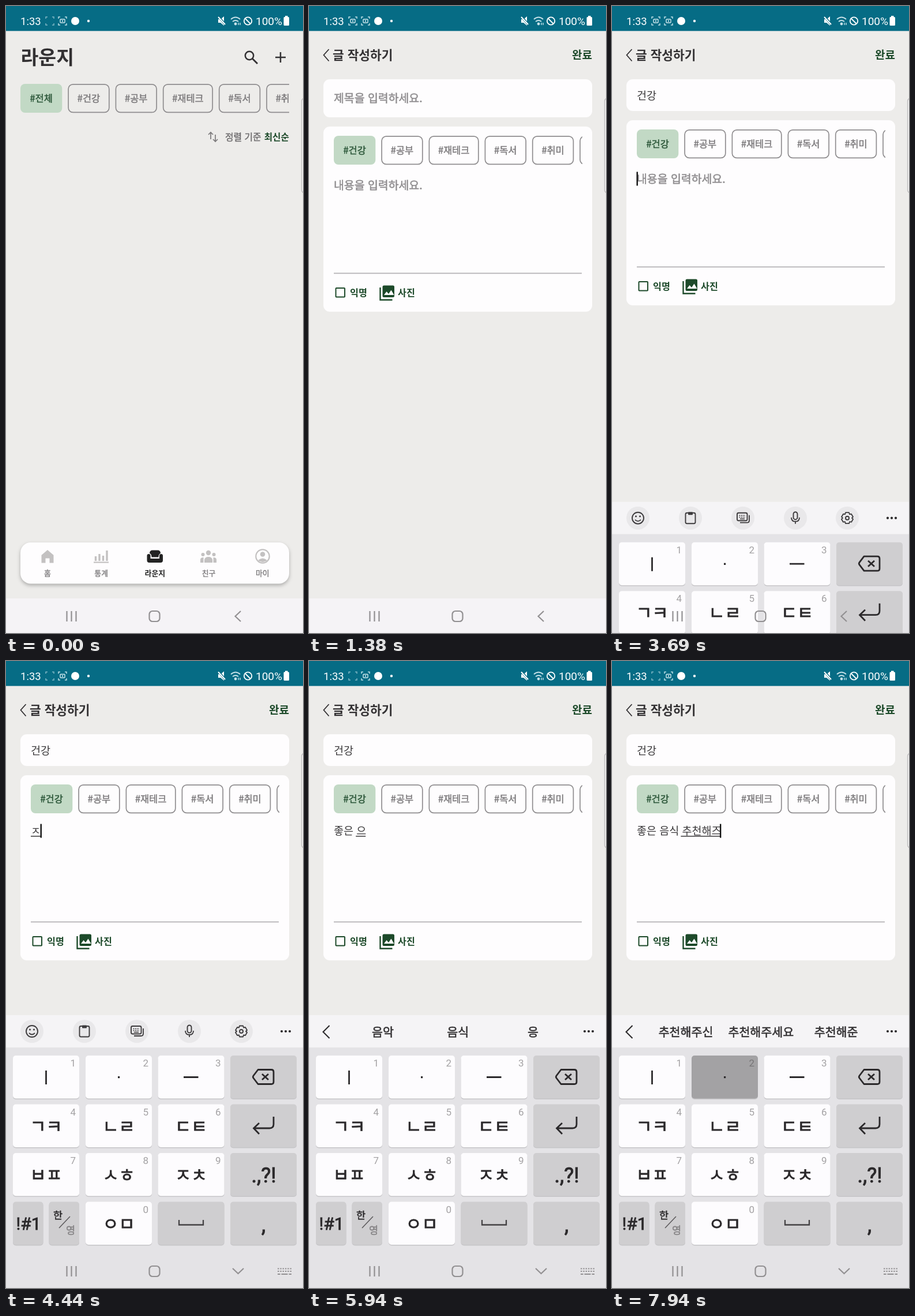
An HTML page that plays this animation: 515x1087 px, repeating every 8 s.

```html
<!DOCTYPE html>
<html lang="ko">
<head>
<meta charset="utf-8">
<style>
html, body { margin: 0; height: 100%; overflow: hidden; background: #edecea; }
svg { display: block; width: 100%; height: 100%; font-family: "Noto Sans CJK KR", "Noto Sans CJK", "Noto Sans", sans-serif; }
.r { font-family: Roboto, sans-serif; }
</style>
</head>
<body>
<svg id="stage" viewBox="0 0 515 1087"></svg>
<script>
const LOOP = 8000, GREEN = '#1d4a2a', GRAY = '#7b797b', INK = '#333133', PALE = '#c3c1c1';
const stage = document.getElementById('stage');

// y is the vertical middle of the text; weight 500 is thickened with a thin outline
function text(x, y, s, size, fill, anchor = 'start', weight = 400, cls = '') {
  const outline = weight === 500 ? `stroke="${fill}" stroke-width="${size * .027}"` : '';
  return `<text x="${x}" y="${y + size * .37}" font-size="${size}" fill="${fill}" text-anchor="${anchor}" font-weight="${weight === 700 ? 700 : 400}" class="${cls}" ${outline}>${s}</text>`;
}
const mid = (x, y, s, size, fill, weight, cls) => text(x, y, s, size, fill, 'middle', weight, cls);
const rect = (x, y, w, h, fill, r = 0, extra = '') =>
  `<rect x="${x}" y="${y}" width="${w}" height="${h}" rx="${r}" fill="${fill}" ${extra}/>`;
const dot = (x, y, r, fill, extra = '') => `<circle cx="${x}" cy="${y}" r="${r}" fill="${fill}" ${extra}/>`;
const line = (d, color, w = 2, extra = '') =>
  `<path d="${d}" fill="none" stroke="${color}" stroke-width="${w}" ${extra}/>`;
const shape = (d, fill) => `<path d="${d}" fill="${fill}"/>`;
const group = (s, attrs) => `<g ${attrs}>${s}</g>`;
const textWidth = (s, size) => [...s].reduce((w, c) => w + (c === ' ' ? .224 : .92), 0) * size;
const clamp = v => Math.max(0, Math.min(1, v));
const ease = v => 1 - (1 - clamp(v)) ** 3;

function chips(x, y, names, clip) {
  let s = '';
  names.forEach((name, i) => {
    const w = name.length > 2 ? 87 : 72.3;
    s += i ? rect(x + .8, y + .8, w - 1.6, 48.6, 'none', 8, 'stroke="#8f8d8f" stroke-width="1.7"')
           : rect(x, y, w, 50, '#c2d9c5', 8);
    s += mid(x + w / 2, y + 25, '#' + name, 16.4, i ? GRAY : '#2b5638', 500);
    x += w + 10;
  });
  return `<svg width="${clip}" height="1087" viewBox="0 0 ${clip} 1087">${s}</svg>`;
}

function statusBar(t) {
  const full = t % 2000 > 1250 && t % 2000 < 1850;
  const bracket = (x, color) => line(`M${x - 7} 22v-3h3M${x + 4} 19h3v3M${x + 7} 30v3h-3M${x - 4} 33h-3v-3`, color, 1.5);
  const camera = x => rect(x - 4, 23, 8, 6, 'none', 1, 'stroke="#d6eaef" stroke-width="1.4"') + dot(x, 26, 1.2, '#d6eaef');
  return rect(0, 0, 515, 43.3, '#066c85') +
    text(25, 26, '1:33', 18.5, '#fff', 'start', 400, 'r') +
    bracket(76, full ? '#b9dbe3' : '#7fb5c3') + (full ? camera(76) : '') + bracket(98, '#b9dbe3') + camera(98) +
    dot(120, 26, 7, '#fff') + dot(143, 26, 2.2, '#fff') +
    shape('M368 23h4l6-5v16l-6-5h-4z', '#fff') + line('M368 18l13 15', '#066c85', 4) + line('M368 19l12 13', '#fff', 2) +
    line('M390 23q8-7 16 0M393 27q5-4 10 0', '#c6e1e8', 1.8) + dot(398, 31, 2.4, '#c6e1e8') +
    line('M403 29v4m3-4v4', '#c6e1e8', 1.4) +
    line('M414 21l10 10', '#fff', 1.8) + dot(419.5, 26, 6.7, 'none', 'stroke="#fff" stroke-width="1.8"') +
    text(433, 26, '100%', 19, '#fff', 'start', 400, 'r') +
    rect(481.5, 19, 9.5, 15, '#fff', 1.5) + rect(484, 17, 4.5, 3, '#fff');
}

function tabBar() {
  const tabs = ['홈', '통계', '라운지', '친구', '마이'];
  return rect(25, 930, 466, 71.5, '#fefdfe', 18, 'style="filter:drop-shadow(0 3px 3px #0004)"') +
    shape('M61.5 952L72 943l10.5 9v13.5h-7v-8h-7v8h-7z', PALE) +
    line('M155.5 962v-8M162 962v-12M168.5 962v-9M175 962v-18', PALE, 3.4) + line('M152 964.5h26', PALE, 2.2) +
    shape('M249 949q0-5.5 5-5.5h9q5 0 5 5.5q-3.5 1-3.5 6.5h-12q0-5.5-3.5-6.5z', '#232323') +
    shape('M244.5 953q0-3 3-3t3 3v5h15.5v-5q0-3 3-3t3 3v8q0 4-4 4h-19.5q-4 0-4-4z', '#232323') +
    dot(351, 948, 4.2, PALE) + dot(341.5, 951, 3, PALE) + dot(360.5, 951, 3, PALE) +
    shape('M344 965v-5q1-5 7-5t7 5v5zM337 965v-5q0-4 5.5-4v9zM365 965v-5q0-4-5.5-4v9z', PALE) +
    dot(445, 954, 11.7, 'none', `stroke="${PALE}" stroke-width="2.2"`) + dot(445, 950.5, 4.3, PALE) +
    shape('M437 961q8-7 16 0q-8 6-16 0z', PALE) +
    tabs.map((s, i) => mid(72 + i * 93.2, 983, s, 12.9, i === 2 ? '#232323' : GRAY, i === 2 ? 700 : 500)).join('');
}

function lounge() {
  return text(25.5, 89, '라운지', 33.5, INK, 'start', 700) +
    dot(422, 86, 7.2, 'none', `stroke="${INK}" stroke-width="2.5"`) + line('M427 91l9 9', INK, 2.8) +
    line('M467 89h18M476 80v18', INK, 2.5) +
    chips(25, 135, ['전체', '건강', '공부', '재테크', '독서', '취미'], 491) +
    line('M355 231v-12m-4 4l4-4 4 4M363 223v12m-4-4l4 4 4-4', GRAY, 1.7) +
    text(380, 227, '정렬 기준', 15.8, '#6f6d6f', 'start', 500) +
    text(491, 227, '최신순', 15.7, GREEN, 'end', 700) + tabBar();
}

// Editable text, underlined while the word is being composed, with its caret
function field(x, y, value, hint, hintY, caret) {
  const word = value === '건강' ? '' : value.split(' ').pop();
  const end = x + textWidth(value, 18.5), start = end - textWidth(word, 18.5);
  return (value ? text(x, y, value, 18.5, '#3a383a') : text(x, hintY, hint, 19.4, '#8f8d8f', 'start', 500)) +
    (word ? rect(start, y + 8.5, end - start, 1.5, '#3a383a') : '') +
    (caret ? rect(end - .5, (value ? y : hintY) - 12, 2.4, 24, '#111') : '');
}

function editor(s) {
  const up = s.title ? -11 : 0;
  const body = rect(25, 209, 466, 321, '#fefdfe', 11) +
    chips(43, 225, ['건강', '공부', '재테크', '독서', '취미', '취업'], 474) +
    field(43, 305.5, s.body, '내용을 입력하세요.', 310.5, s.caret && s.inBody) +
    rect(43, 462.5, 430, 1.8, '#b5b3b6') +
    rect(46.5, 489, 15.5, 15.5, 'none', 1, `stroke="${GREEN}" stroke-width="2"`) +
    text(71, 497, '익명', 16.2, GREEN, 'start', 700) +
    line('M123.5 488v21.5h21', GREEN, 2.4) + rect(127.5, 484.5, 20.5, 20.5, GREEN, 2.5) +
    shape('M130 501l4.5-6 3.5 4 4.5-6.5 5 8.5z', '#fefdfe') +
    text(154, 497, '사진', 16.2, GREEN, 'start', 700);
  return line('M34.5 75l-9 10 9 10.5', INK, 1.8) +
    text(41, 85, '글 작성하기', 21.4, INK, 'start', 700) +
    text(491, 85, '완료', 19, GREEN, 'end', 700) +
    rect(25, 127, 466, 66 + up, '#fefdfe', 11) +
    field(43, 155, s.title, '제목을 입력하세요.', 160, s.caret && !s.inBody) +
    group(body, `transform="translate(0 ${up})"`);
}

function toolIcons() {
  const c = '#3c3a3c', o = `stroke="${c}" stroke-width="1.9"`;
  return [45, 136, 227, 318, 408].map(x => dot(x, 642, 20, '#e9e8ea')).join('') +
    dot(45, 642, 10, 'none', o) + dot(41.5, 639, 1.5, c) + dot(48.5, 639, 1.5, c) + line('M40 645q5 5 10 0', c, 1.8) +
    rect(127.5, 633, 17, 18.5, 'none', 2.5, o) + rect(132, 631.5, 8, 5, c, 1) +
    rect(217, 633, 17.5, 13.5, 'none', 2.5, o) + line('M238 637v9q0 4-4 4h-12', c, 1.8) +
    line('M220.5 637.5h11M220.5 640.5h11', c, 1.6, 'stroke-dasharray="2 1.6"') + line('M222 643.5h8', c, 1.5) +
    rect(314.5, 631.5, 7, 13, 'none', 3.5, o) + line('M311 641q0 7 7 7t7-7M318 648v4', c, 1.8) +
    dot(408, 642, 3, 'none', o) +
    line('M405 632.5h6l1 3 3-.5 3 5-2 2 2 2-3 5-3-.5-1 3h-6l-1-3-3 .5-3-5 2-2-2-2 3-5 3 .5z', c, 1.8, 'stroke-linejoin="round"');
}

const COLS = [12, 138, 263.5, 389], ROWS = [684, 768.5, 853, 937.5];
const LABELS = { 4: 'ㄱㅋ', 5: 'ㄴㄹ', 6: 'ㄷㅌ', 8: 'ㅂㅍ', 9: 'ㅅㅎ', 10: 'ㅈㅊ', 13: 'ㅇㅁ' };

function keyboard(s) {
  const c = '#2b292b';
  const box = (x, y, w, fill) => rect(x, y + 1.5, w, 74.5, '#c6c5c8', 5) + rect(x, y, w, 74.5, fill, 5);
  let out = rect(0, 614, 515, 56, '#f5f4f6') + rect(0, 670, 515, 417, '#e4e3e6');
  out += s.words
    ? line('M35.5 632l-11 11 11 11', c, 2.1) + s.words.split(' ').map((w, i) => mid(128 + i * 130.3, 643, w, 20.6, INK, 500)).join('')
    : toolIcons();
  out += [478, 485, 492].map(x => dot(x, 642, 2.1, c)).join('');
  for (let i = 0; i < 16; i++) {
    const x = COLS[i % 4], y = ROWS[i >> 2];
    if (i === 12) { out += box(12, y, 52.5, '#cfced0') + box(74.5, y, 52.5, '#cfced0'); continue; }
    const letter = i % 4 < 3 && i !== 14;
    out += box(x, y, 115, i === s.pressed ? '#a3a2a4' : letter ? '#fdfcfe' : '#cfced0');
    if (letter) {
      const n = i === 13 ? 0 : (i >> 2) * 3 + i % 4 + 1;
      out += text(x + 109, y + 13, n, 17, i === s.pressed ? '#777577' : '#a3a1a3', 'end', 400, 'r');
    }
    if (LABELS[i]) out += mid(x + 57.5, y + 38, LABELS[i], 30.5, c, 500);
  }
  return out + line('M69.5 710v24M308 721.5h25.5', c, 2.8) + rect(194, 720, 3.2, 3.2, c) +
    line('M437 708.5h23q4 0 4 4v17q0 4-4 4h-23l-8-10.5q-1.5-2 0-4zM444 716l11 10M455 716l-11 10', c, 2.8, 'stroke-linejoin="round"') +
    (s.inBody ? line('M464 790v13q0 7-7 7h-27M439 801l-9.5 9 9.5 10', c, 2.8) : mid(446, 806, '완료', 26, '#2f90d3', 500)) +
    mid(447, 891, '.,?!', 36, c, 500, 'r') + mid(446.5, 977, ',', 36, c, 500, 'r') +
    mid(39, 974.5, '!#1', 30, c, 500, 'r') +
    mid(90, 961, '한', 17.5, c, 500) + mid(112, 987, '영', 17.5, '#858385', 500) + line('M92 983l19-20', '#5a585a', 1.5) +
    line('M300 969v8.5h42V969', '#444244', 2.3);
}

function systemNav(open) {
  const c = '#929092';
  return line('M105.5 1049v18M113.5 1049v18M121.5 1049v18', c, 2.2) +
    rect(248.5, 1049, 18, 18, 'none', 5.5, `stroke="${c}" stroke-width="2.2"`) +
    (open
      ? line('M393 1053l9.5 9 9.5-9', c, 2.2) + line('M471 1053.5h24M471 1058h24', c, 2.2, 'stroke-dasharray="2.4 1.9"') +
        line('M471 1063h4.5m2 0h11m2 0h4.5', c, 2.2)
      : line('M407 1049l-9.5 9 9.5 9', c, 2.2));
}

// time, text, pressed key, suggestions (kept until the next set)
const W1 = '건강 건대 건담', W2 = '좋은 좋아 좋다', W3 = '음악 음식 응', W4 = '추천 축구 출근', W5 = '추천해주신 추천해주세요 추천해준';
const G = '좋은 ', F = '좋은 음식 ';
const STEPS = [
  [1700, '', -1, ''], [2110, 'ㄱ', 4], [2220, 'ㄱㆍ', 1], [2330, '거', 0, W1], [2465, '건', -1], [3080, '건강', -1],
  [3200, '', -1], [3600, '', -1, ''],
  [4300, 'ㅈ', 10], [4520, 'ㅈㆍ', 1], [4600, '조', 2, W2], [4720, '좃', 9], [4810, '좋', 9],
  [4960, '좋ㅇ', 13], [5040, '좋으', 2], [5120, '좋은', 5], [5220, G, 14],
  [5310, G + 'ㅇ', 13], [5400, G + '으', 2, W3], [6040, G + '응', -1], [6120, G + '음', -1],
  [6230, G + '음ㅅ', 9], [6340, G + '음시', 0], [6580, G + '음식', 4], [6680, F, 14],
  [6780, F + 'ㅈ', 10], [6850, F + 'ㅊ', 10], [6930, F + '츠', 2, W4], [7000, F + '추', 1],
  [7080, F + '춪', 10], [7160, F + '춫', 10], [7340, F + '추ㅊㆍ', 1], [7420, F + '추처', 0],
  [7490, F + '추천', -1], [7560, F + '추천ㅎ', -1], [7620, F + '추천히', 0], [7680, F + '추천하', 1],
  [7745, F + '추천해', 0, W5], [7810, F + '추천해ㅈ', -1], [7860, F + '추천해즈', 2], [7925, F + '추천해즈', 1]
];

function stateAt(t) {
  const s = { title: '', body: '', words: '', pressed: -1, caret: false, inBody: t >= 3200 };
  for (const [at, value, key, words] of STEPS) {
    if (at > t) break;
    if (words !== undefined) s.words = words;
    s.title = at < 3200 ? value : '건강';
    s.body = at < 3200 ? '' : value;
    s.pressed = t - at < 75 ? key : -1;
    s.caret = (t - at) % 1000 < 500;
  }
  return s;
}

function keyboardRise(t) {
  if (t < 3320) return ease((t - 1750) / 280);
  return t < 3600 ? 1 - ease((t - 3320) / 240) : ease((t - 3640) / 260);
}

function scene(t) {
  const s = stateAt(t), fade = clamp((t - 500) / 700), rise = keyboardRise(t);
  return rect(0, 0, 515, 1087, '#edecea') +
    (fade < 1 ? group(lounge(), `opacity="${1 - fade}"`) : '') +
    (fade > 0 ? group(editor(s), `opacity="${fade}"`) : '') +
    rect(512.5, 160, 12, 164, '#f2f1f1', 5, 'stroke="#b9b7b8" stroke-width="1.2"') +
    statusBar(t) + rect(0, 1027, 515, 60, '#f5f3f6') +
    (rise > 0 ? group(keyboard(s), `transform="translate(0 ${(1 - rise) * 473})"`) : '') +
    systemNav(rise > .5);
}

let shown = '';
function tick() {
  const next = scene(performance.now() % LOOP);
  if (next !== shown) stage.innerHTML = shown = next;
  requestAnimationFrame(tick);
}
tick();
</script>
</body>
</html>
```
